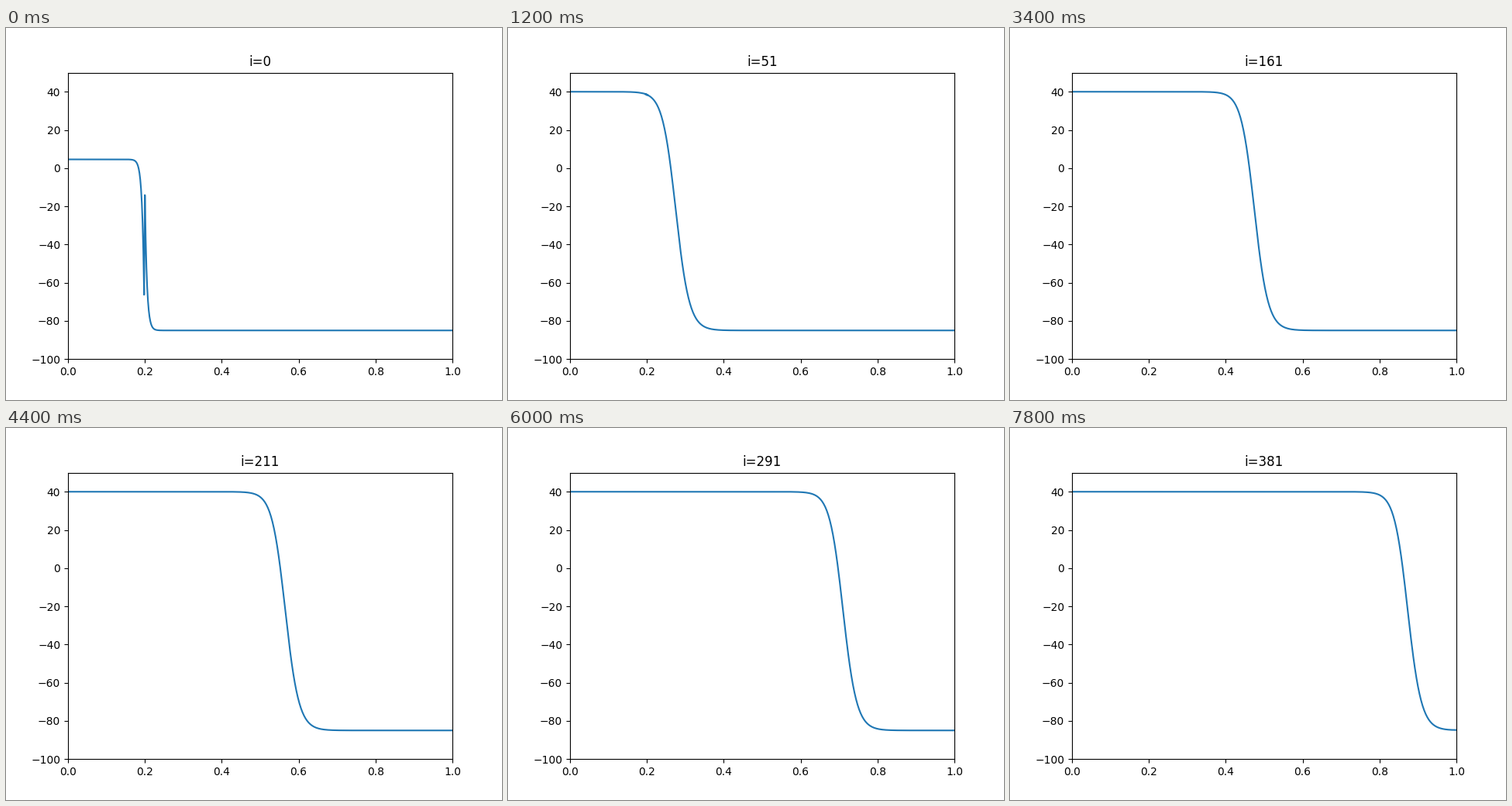
These frames come from a looping animation (640x480 px, 8000 ms). A matplotlib script:

```python
import numpy as np
import matplotlib.pyplot as plt
from matplotlib.animation import FuncAnimation

FRAMES = 40
REST, THRESH, PEAK = -85.0, -60.0, 40.0
RATE = 0.35 / (PEAK - REST) ** 2   # reaction strength per step
DIFF = 5.47e-5                     # diffusion per step
CELLS = 500


def step_index(k):
    return max(0, 10 * k - 9)


def reaction(u):
    return -RATE * (u - REST) * (u - THRESH) * (u - PEAK)


def solve(x, steps):
    """Crank-Nicolson diffusion with an explicit bistable reaction."""
    n = len(x)
    lap = np.diag(np.full(n, -2.0)) + np.eye(n, k=1) + np.eye(n, k=-1)
    lap[0, 1] = lap[-1, -2] = 2.0
    half = 0.5 * DIFF * CELLS ** 2 * lap
    inv = np.linalg.inv(np.eye(n) - half)
    spread = inv @ (np.eye(n) + half)

    u = np.where(x < 0.2 - 1e-9, 0.0, REST)
    waves = []
    for _ in range(steps):
        u = spread @ u + inv @ reaction(u)
        waves.append(u)
    return waves


x = np.linspace(0, 1, CELLS + 1)
waves = solve(x, step_index(FRAMES - 1) + 1)

fig, ax = plt.subplots(figsize=(6.4, 4.8), dpi=100)
line, = ax.plot(x, waves[0], color="#1f77b4", lw=1.5)
ax.set_xlim(0, 1)
ax.set_ylim(-100, 50)
title = ax.set_title("i=0")


def draw(k):
    i = step_index(k)
    line.set_ydata(waves[i])
    title.set_text(f"i={i}")
    return line, title


anim = FuncAnimation(fig, draw, frames=FRAMES, interval=200,
                     repeat=True, repeat_delay=0, blit=False)
plt.show()
```
